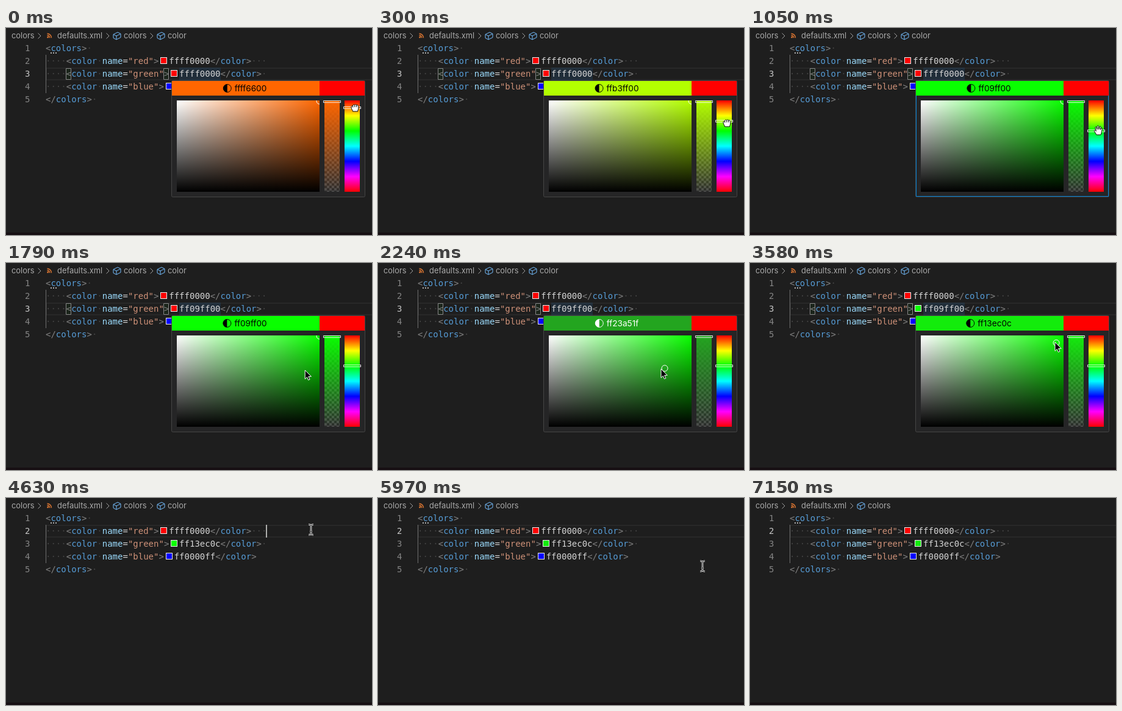
Recreate the animation shown at these times as an HTML page. Size 600 by 340 pixels, loop 7170 ms.

```html
<!DOCTYPE html>
<html lang="en">
<head>
<meta charset="utf-8">
<title>Colour picker in an editor</title>
<style>
html, body { margin: 0; width: 100%; height: 100%; overflow: hidden; background: #1e1e1e; }
svg { display: block; }
text { white-space: pre; }
.code { font: 14px "DejaVu Sans Mono", monospace; fill: #d4d4d4; }
.ui { font: 12.9px Inter, sans-serif; fill: #a9a9a9; }
.tag { fill: #569cd6; }
.attr { fill: #9cdcfe; }
.str { fill: #ce9178; }
.punc { fill: #808080; }
.dot { fill: #434343; }
.num { fill: #858585; }
.num.on { fill: #c6c6c6; }
.swatch { stroke: #eee; }
.line { fill: none; stroke: #a0a0a0; }
.slider { fill: none; stroke: #fff; stroke-opacity: .85; }
</style>
</head>
<body>
<svg width="600" height="340" viewBox="0 0 600 340">
  <defs>
    <linearGradient id="white"><stop stop-color="#fff"/><stop id="hueStop" offset="1"/></linearGradient>
    <linearGradient id="black" x2="0" y2="1"><stop stop-opacity="0"/><stop offset="1"/></linearGradient>
    <linearGradient id="fade" x2="0" y2="1"><stop class="pick"/><stop class="pick" offset="1" stop-opacity="0"/></linearGradient>
    <linearGradient id="rainbow" x2="0" y2="1"></linearGradient>
    <pattern id="checker" x="522" y="119" width="8" height="8" patternUnits="userSpaceOnUse">
      <path fill="#2c2c2c" d="M0 0h8v8h-8z"/><path fill="#4b4b4b" d="M0 0h4v4h-4zM4 4h4v4h-4z"/>
    </pattern>
    <clipPath id="box"><path d="M280 119h234v150h-234z"/></clipPath>
    <path id="chevron" class="line" d="M-2.5 -4.5L2 0L-2.5 4.5"/>
    <path id="cube" fill="none" stroke="#75beff" stroke-linejoin="round" d="M-6 -2.5L1 -6L6 -3.5V2.5L-1 6L-6 3.5ZM-6 -2.5L-1 0L6 -3.5M-1 0V6"/>
  </defs>

  <rect width="600" height="340" fill="#1e1e1e"/>
  <rect y="336" width="600" height="4" fill="#170f13"/>

  <g class="ui">
    <text x="9" y="17">colors</text>
    <use href="#chevron" x="55" y="13"/>
    <g fill="none" stroke="#e37933" stroke-width="1.5">
      <path d="M67.5 9.2a7 7 0 0 1 7 7M67.5 12a4.2 4.2 0 0 1 4.2 4.2"/>
      <circle cx="68.6" cy="15.2" r=".6"/>
    </g>
    <text x="84" y="17">defaults.xml</text>
    <use href="#chevron" x="167" y="13"/>
    <use href="#cube" x="182" y="13"/>
    <text x="193" y="17">colors</text>
    <g id="crumb">
      <use href="#chevron" x="239" y="13"/>
      <use href="#cube" x="254" y="13"/>
      <text x="265" y="17">color</text>
    </g>
  </g>

  <rect id="row" x="66" width="540" height="19" fill="none" stroke="#282828" stroke-width="2"/>
  <path stroke="#707070" d="M65.5 44V107"/>
  <g id="match">
    <rect x="284" y="65" width="68" height="21" fill="#264f78" fill-opacity=".3"/>
    <path fill="#006400" fill-opacity=".1" stroke="#888" d="M98.5 66.5h8v18h-8zM258.5 66.5h8v18h-8z"/>
  </g>
  <g id="code" class="code"></g>
  <path fill="#b0b0b0" d="M73 40h2v2h-2zM77 40h2v2h-2zM81 40h2v2h-2z"/>
  <rect id="caret" x="426" y="44" width="2" height="21" fill="#aeafad"/>

  <g id="picker">
    <rect x="271.5" y="86.5" width="317" height="191" rx="2" fill="#252526" stroke="#454545"/>
    <rect id="focus" x="272.5" y="87.5" width="315" height="189" fill="none" stroke="#007fd4"/>
    <rect id="head" x="272" y="87" width="242" height="24"/>
    <rect x="514" y="87" width="74" height="24" fill="#f00"/>
    <g id="label">
      <g id="mode">
        <circle r="6.5" fill="none" stroke="currentColor"/>
        <path fill="currentColor" d="M0 -6.5a6.5 6.5 0 0 0 0 13z"/>
      </g>
      <text id="hex" x="401" y="104" text-anchor="middle" fill="currentColor" style="font:13.6px Inter,sans-serif"></text>
    </g>
    <rect x="280" y="119" width="234" height="150" fill="url(#white)"/>
    <rect x="280" y="119" width="234" height="150" fill="url(#black)"/>
    <g clip-path="url(#box)"><circle id="ring" r="5" fill="none" stroke="#fff"/></g>
    <rect x="522" y="119" width="25" height="150" fill="url(#checker)"/>
    <rect x="522" y="119" width="25" height="150" fill="url(#fade)"/>
    <rect class="slider" x="520.5" y="119.5" width="28" height="3"/>
    <rect x="555" y="119" width="25" height="150" fill="url(#rainbow)"/>
    <rect id="hueBar" class="slider" x="553.5" width="28" height="3"/>
  </g>

  <g id="pointer">
    <g id="fist" fill="#fff" stroke="#000" stroke-linejoin="round">
      <path d="M-6 -1C-6 -3-4 -3.5-3.5 -3C-3 -5.5-.8 -5.5-.3 -4.3C.3 -5.8 2.6 -5.5 2.9 -4C4 -5 5.8 -4 5.8 -2.3V1C5.8 3 4.5 4 4.5 6H-3.5C-3.5 4-6 2.5-6 -1Z"/>
      <path fill="none" d="M-3.3 -3V-.5M-.2 -4V-1M2.8 -4V-1"/>
    </g>
    <g id="hand" fill="#fff" stroke="#000" stroke-linejoin="round">
      <path d="M-3 7.5C-4 5-6 3-6.5 1.2C-6.8 -.3-5 -.6-3.6 1.4L-5 -4.2C-5 -6-3.2 -6-2.8 -4.5L-1.9 -1.5L-1.8 -6.5C-1.6 -8 .4 -8 .6 -6.5L.9 -1.5L2.1 -5.8C2.7 -7.2 4.4 -6.6 4.1 -5L3.5 -1L5 -3.2C6 -4.2 7 -3.2 6.5 -2C5.4 1 5.6 4 4 7.5Z"/>
    </g>
    <path id="arrow" stroke="#fff" d="M0 0V14.5L3.3 11.4L5.4 16.3L7.8 15.3L5.7 10.4H10.2Z"/>
    <g id="beam" fill="none">
      <path id="bar" stroke="#fff" stroke-width="2.6" d="M-4 -8.5Q-1 -8.5 0 -7Q1 -8.5 4 -8.5M0 -7V7M-4 8.5Q-1 8.5 0 7Q1 8.5 4 8.5M-2 3H2"/>
      <path stroke="#000" stroke-width=".9" d="M-4 -8.5Q-1 -8.5 0 -7Q1 -8.5 4 -8.5M0 -7V7M-4 8.5Q-1 8.5 0 7Q1 8.5 4 8.5M-2 3H2"/>
    </g>
  </g>
</svg>
<script>
const LOOP = 7170, TICK = 148.95;
const CHAR = 8.43, LEFT = 65;
const $ = id => document.getElementById(id);
const set = (el, attrs) => { for (const k in attrs) el.setAttribute(k, attrs[k]); };
const show = (id, on) => $(id).style.display = on ? '' : 'none';

// Tables of [tick, values...], linear between rows.
const HUE = [[0, 24], [1, 52], [2, 78], [3, 96], [4, 110], [5, 118]];
const SHADE = [[14, 1, 1], [15, 134 / 165, 165 / 255], [21, .91, .83], [24, 224 / 236, 236 / 255]];
const PATH = [
  [0, 572, 131], [2, 572, 156], [5, 572, 168], [7, 571, 168], [8, 571, 168],
  [13, 470, 178], [14, 464, 174], [15, 464, 174], [21, 489, 145], [24, 500, 130],
  [27, 500, 130], [28, 500, 112], [29, 500, 72], [30, 500, 52], [39, 500, 52],
  [40, 532, 112], [41, 573, 199], [42, 573, 199], [43, 577, 238], [45, 582, 322], [46, 583, 370]
];

function at(table, k) {
  const i = table.findIndex(row => row[0] > k);
  if (i === 0) return table[0].slice(1);
  if (i < 0) return table[table.length - 1].slice(1);
  const a = table[i - 1], b = table[i], p = (k - a[0]) / (b[0] - a[0]);
  return a.slice(1).map((v, j) => v + (b[j + 1] - v) * p);
}

function rgb(h, s, v) {
  const part = n => {
    const q = (n + h / 60) % 6;
    return Math.round(255 * (v - v * s * Math.max(0, Math.min(q, 4 - q, 1))) + 1e-6);
  };
  return [part(5), part(3), part(1)];
}
const toHex = c => c.map(n => n.toString(16).padStart(2, '0')).join('');

function tokens(src) {
  return src.match(/<\/?|>|"\w+"|·+|=|\w+/g).map(tok => {
    const cls = /[<>]/.test(tok) ? 'punc' : tok[0] === '"' ? 'str' : tok[0] === '·' ? 'dot'
      : /^colors?$/.test(tok) ? 'tag' : tok === 'name' ? 'attr' : '';
    const safe = tok.replace('<', '&lt;').replace('>', '&gt;');
    return `<tspan class="${cls}">${safe}</tspan>`;
  }).join('');
}

function codeLine(n, head, fill, value, tail) {
  const y = 17 + 21 * n;
  let out = `<text id="num${n}" class="num" x="31" y="${y}">${n}</text>`;
  out += `<text x="${LEFT}" y="${y}">${tokens(head)}</text>`;
  if (!fill) return out;
  const x = LEFT + head.length * CHAR;
  return out +
    `<rect id="swatch${n}" class="swatch" x="${Math.round(x + 2.8) + .5}" y="${y - 10.5}" width="10" height="10" fill="${fill}"/>` +
    `<text x="${x + 16.8}" y="${y}"><tspan id="value${n}">${value}</tspan>${tokens(tail)}</text>`;
}

$('code').innerHTML =
  codeLine(1, '<colors>·') +
  codeLine(2, '····<color·name="red">', '#f00', 'ffff0000', '</color>···') +
  codeLine(3, '····<color·name="green">', '#f00', 'ffff0000', '</color>·') +
  codeLine(4, '····<color·name="blue">', '#00f', 'ff0000ff', '</color>') +
  codeLine(5, '</colors>·');

$('rainbow').innerHTML = [0, 60, 120, 180, 240, 300, 360].map(h =>
  `<stop offset="${h / 360}" stop-color="#${toHex(rgb(h, 1, 1))}"/>`).join('');

function drawPicker(k) {
  const [h] = at(HUE, k), [s, v] = at(SHADE, k);
  const c = rgb(h, s, v), css = '#' + toHex(c);
  const light = c[0] * 299 + c[1] * 587 + c[2] * 114 >= 128000;
  set($('head'), { fill: css });
  set($('hueStop'), { 'stop-color': '#' + toHex(rgb(h, 1, 1)) });
  document.querySelectorAll('.pick').forEach(el => set(el, { 'stop-color': css }));
  $('label').style.color = light ? '#000' : '#fff';
  $('hex').textContent = 'ff' + toHex(c);
  const iconX = 401 - $('hex').getComputedTextLength() / 2 - 12;
  set($('mode'), { transform: `translate(${iconX} 99)` });
  set($('ring'), { cx: 280 + s * 234, cy: 120 + (1 - v) * 150 });
  set($('hueBar'), { y: Math.round(119 + h / 360 * 146) + .5 });
  show('focus', k === 7 || k === 27);
}

function drawEditor(k) {
  const line = k < 31 ? 3 : 2;
  set($('row'), { y: 3 + 21 * line });
  for (let n = 1; n <= 5; n++) $('num' + n).classList.toggle('on', n === line);
  $('value3').textContent = k < 8 ? 'ffff0000' : k < 28 ? 'ff09ff00' : 'ff13ec0c';
  set($('swatch3'), { fill: k < 18 ? '#f00' : k < 38 ? '#09ff00' : '#13ec0c' });
  show('match', line === 3);
  show('crumb', k < 32);
  show('caret', (k >= 31 && k < 34) || (k >= 37 && k < 40) || (k >= 43 && k < 48));
}

function drawPointer(k) {
  const [x, y] = at(PATH, k);
  const kind = k < 7 ? 'fist' : k < 9 ? 'hand' : k < 29 ? 'arrow' : 'beam';
  for (const id of ['fist', 'hand', 'arrow', 'beam']) show(id, id === kind);
  set($('pointer'), { transform: `translate(${x} ${y})` });
  show('pointer', k < 46);
}

let last = -1;
const start = performance.now();
function frame() {
  const k = Math.floor((performance.now() - start) % LOOP / TICK);
  if (k !== last) {
    last = k;
    show('picker', k < 29);
    if (k < 29) drawPicker(k);
    drawEditor(k);
    drawPointer(k);
  }
  requestAnimationFrame(frame);
}
frame();
</script>
</body>
</html>
```
